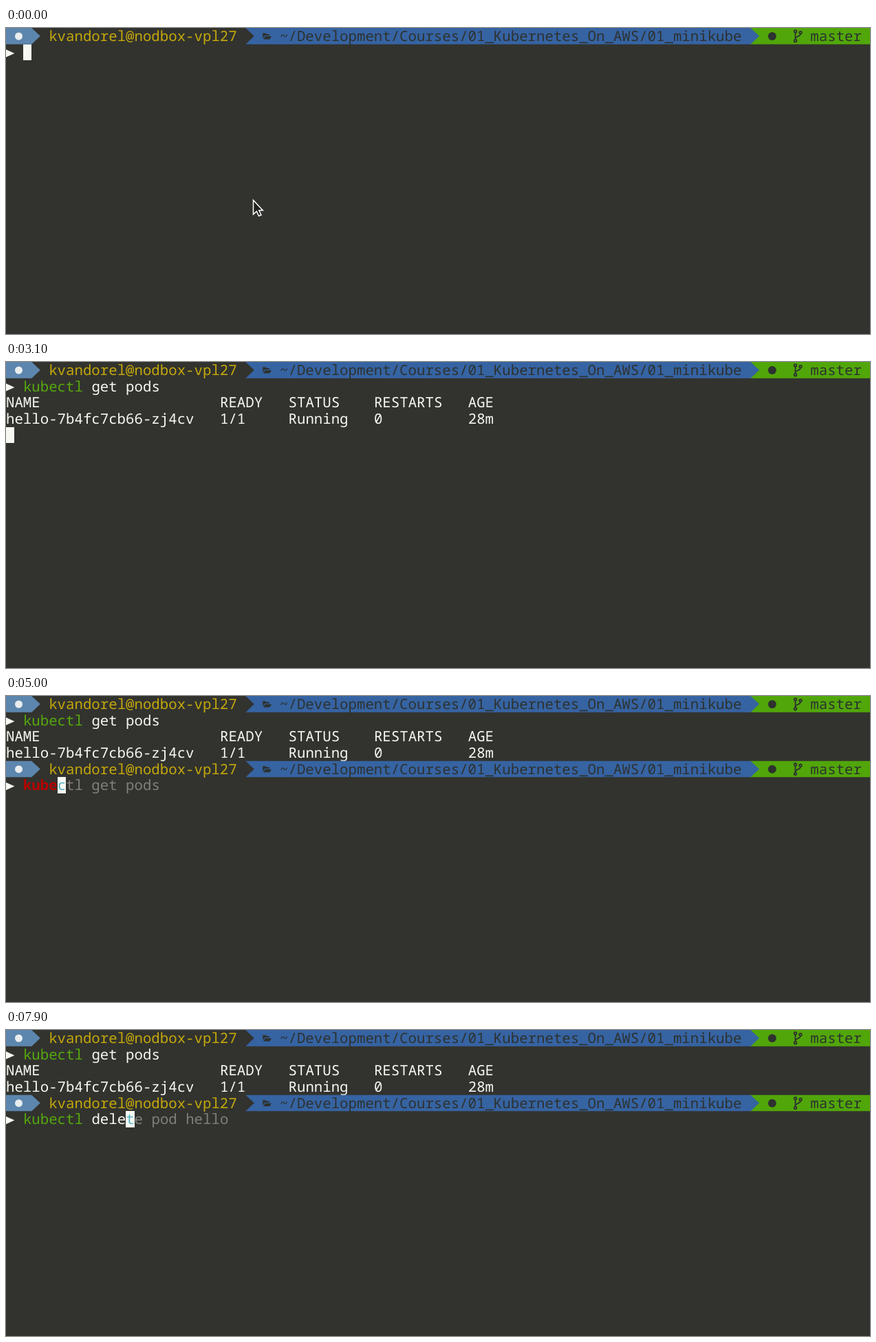
Recreate the animation shown at these times as an HTML page. Size 1256 by 446 pixels, loop 8000 ms.

```html
<!DOCTYPE html>
<html lang="en">
<head>
<meta charset="utf-8">
<title>Terminal</title>
<style>
  :root { --w: 12.44px; --h: 23.67px; }
  html, body { margin: 0; width: 100%; height: 100%; overflow: hidden; background: #32332e; }
  #stage {
    position: relative; width: 1256px; height: 446px; overflow: hidden;
    background: #32332e; color: #f8f8f2;
    font: 20.73px/calc(var(--h) + 1.4px) "Noto Sans Mono", monospace;
    text-rendering: geometricPrecision; font-variant-ligatures: none;
  }
  .row { position: absolute; left: 0; top: calc(var(--r) * var(--h)); width: 1256px; height: var(--h); white-space: pre; }
  .art { position: absolute; left: 0; top: 0; }
  .at { position: absolute; top: 0; left: calc(var(--c) * var(--w)); }
  .user { color: #c4a80c; }
  .dark { color: #2d322f; }
  .ok { color: #56a80e; }
  .bad { color: #b80000; font-weight: 700; }
  .hint { color: #7f807b; }
  .path { text-decoration: underline 1.5px; text-underline-offset: 1.5px; }
  .cursor { width: var(--w); height: var(--h); background: #f8f8f2; color: #50b6c3; }
  #mouse { position: absolute; left: 356px; top: 247px; }
</style>
</head>
<body>
<div id="stage">
  <div id="screen"></div>
  <svg id="mouse" width="22" height="32">
    <path d="M3.5 4V24.5L8.3 20.2L11.6 27L15 25.5L11.8 18.7H17.3Z" fill="#22231f" stroke="#fff" stroke-width="1.5"/>
  </svg>
</div>
<script>
const LOOP = 8000, LINE = 23.67;
const GET = 'kubectl get pods';
const DESCRIBE = 'kubectl describe deployments.apps hello';
const DELETE = 'kubectl delete pod hello';

// [start, typed text, suggested command]
const first = [
  [0, '', ''], [700, 'k', GET], [1000, 'ku', GET], [1300, 'kub', GET],
  [1500, 'kube', GET], [2400, GET, GET]
];
const second = [
  [3400, '', ''], [4500, 'k', GET], [4800, 'ku', GET], [5000, 'kube', GET],
  [5400, 'kubec', GET], [5500, 'kubect', GET], [5900, 'kubectl', GET],
  [6300, 'kubectl ', GET], [6500, 'kubectl d', DESCRIBE], [7500, 'kubectl de', DESCRIBE],
  [7800, 'kubectl del', DELETE], [7900, 'kubectl dele', DELETE]
];

const row = (r, html) => `<div class="row" style="--r:${r}">${html}</div>`;
const at = (col, text, cls = '') => `<span class="at ${cls}" style="--c:${col}">${text}</span>`;
const cursor = (col, ch = '') => at(col, ch, 'cursor');

// Status bar segments, icons and the prompt triangle below them
const bar = r => `<svg class="art" width="1256" height="446"><g transform="translate(0 ${r * LINE})">
  <path d="M1082.3 0H1256V23.67H1082.3Z" fill="#51a60a"/>
  <path d="M348.3 0H1082.5L1095 11.8L1082.5 23.67H348.3L360.8 11.8Z" fill="#3663a2"/>
  <path d="M0 0H37.3L49.8 11.8L37.3 23.67H0Z" fill="#5c86ae"/>
  <circle cx="18.5" cy="12" r="5.5" fill="#e9edee"/>
  <g fill="#2d322f">
    <path d="M373 7.5H377.5L379 9H383V11H376L373.6 15.5ZM376.7 12H386L383.3 16.5H374.2Z"/>
    <circle cx="1113.8" cy="12" r="6"/>
  </g>
  <g fill="none" stroke="#2d322f" stroke-width="1.8">
    <path d="M1147.5 7V17M1155 8.5C1155 13 1147.5 11.5 1147.5 16"/>
    <circle cx="1147.5" cy="5" r="1.8"/>
    <circle cx="1147.5" cy="18.7" r="1.8"/>
    <circle cx="1155" cy="6.6" r="1.8"/>
  </g>
  <path d="M0 31.2L12.4 36.9L0 42.6Z" fill="#f8f8f2"/>
</g></svg>`;

const prompt = r => bar(r) + row(r,
  at(5, 'kvandorel@nodbox-vpl27', 'user')
  + at(32, '~/Development/Courses/01_Kubernetes_On_AWS/01_minikube', 'dark')
  + at(94, 'master', 'dark'));

function input(r, [, typed, full], active) {
  const known = typed.startsWith('kubectl');
  const word = typed.slice(0, 7), args = typed.slice(8);
  const isPath = args === 'd' || args === 'de';
  const end = 2 + typed.length;
  let html = at(2, word, known ? 'ok' : 'bad') + at(10, args, isPath ? 'path' : '');
  if (active) html += at(end + 1, full.slice(typed.length + 1), 'hint') + cursor(end, full[typed.length]);
  return row(r, html);
}

const cells = (r, list) => row(r, [0, 25, 33, 43, 54].map((c, i) => at(c, list[i])).join(''));
const output = cells(2, ['NAME', 'READY', 'STATUS', 'RESTARTS', 'AGE'])
  + cells(3, ['hello-7b4fc7cb66-zj4cv', '1/1', 'Running', '0', '28m']);

const current = (steps, t) => steps.filter(s => s[0] <= t).pop();

function view(t) {
  let html = prompt(0) + input(1, current(first, t), t < 2800);
  if (t >= 2800 && t < 3100) html += row(2, cursor(0));
  if (t >= 3100) html += output;
  if (t >= 3100 && t < 3400) html += row(4, cursor(0));
  if (t >= 3400) html += prompt(4) + input(5, current(second, t), true);
  return html;
}

const screenEl = document.getElementById('screen');
const mouse = document.getElementById('mouse');
const start = performance.now();
let shown = '';

function draw() {
  const t = (performance.now() - start) % LOOP;
  const html = view(t);
  if (html !== shown) screenEl.innerHTML = shown = html;
  mouse.style.visibility = t < 400 ? 'visible' : 'hidden';
  requestAnimationFrame(draw);
}
draw();
</script>
</body>
</html>
```
